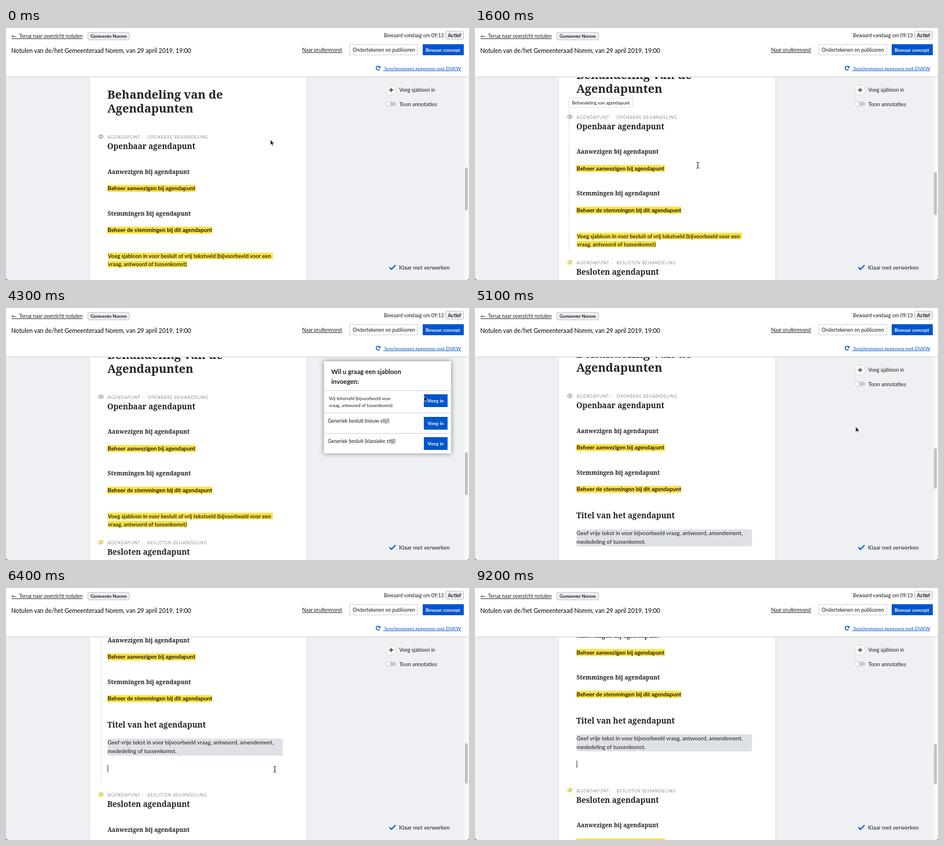
These frames come from a looping animation (800x435 px, 9.3 s). An HTML page:

```html
<!DOCTYPE html>
<html lang="nl">
<head>
<meta charset="utf-8">
<title>Notulen</title>
<style>
html, body { margin: 0; width: 100%; height: 100%; overflow: hidden; background: #333; }
svg { display: block; width: 800px; height: 435px; background: #eff0f3; border-radius: 0 0 4px 4px; }
text { font: 8.6px Lato, sans-serif; fill: #1c1c1c; }
text.b { font-weight: 700; }
text.w { font-size: 8.4px; font-weight: 700; fill: #fff; }
text.u { font-size: 8.8px; text-decoration: underline; }
text.h1, text.h2, text.h3 { font-family: "Noto Serif", serif; font-weight: 700; fill: #222; }
text.h1 { font-size: 20.1px; }
text.h2 { font-size: 13.45px; }
text.h3 { font-size: 10.1px; }
text.cap { font-size: 7.2px; letter-spacing: .75px; fill: #909090; }
text.task { font-size: 9.8px; font-weight: 700; }
text.hint { font-size: 9.4px; font-weight: 700; fill: #38350f; }
text.body { font-size: 9.76px; }
.mark { fill: #fde13f; }
.blue { fill: #05c; }
.line { fill: none; stroke: #cbd2dc; }
.pill { fill: #eeeff1; stroke: #c0c4ca; }
</style>
</head>
<body>
<svg viewBox="0 0 800 435">
  <defs>
    <g id="roll">
      <text class="h3" x="175.5" y="251.5">Aanwezigen bij agendapunt</text>
      <rect class="mark" x="175" y="271" width="153" height="12"/>
      <text class="task" x="175.5" y="280">Beheer aanwezigen bij agendapunt</text>
      <text class="h3" x="175.5" y="323.5">Stemmingen bij agendapunt</text>
      <rect class="mark" x="175" y="343" width="181" height="12"/>
      <text class="task" x="175.5" y="352">Beheer de stemmingen bij dit agendapunt</text>
    </g>
    <g id="eye" fill="none">
      <path d="M-5 0Q0-6.4 5 0Q0 6.4-5 0Z"/>
      <circle r="1.7"/>
    </g>
    <g id="insert">
      <rect class="blue" width="41" height="22"/>
      <text class="w" x="6.5" y="14">Voeg in</text>
    </g>
    <filter id="soft"><feGaussianBlur stdDeviation=".5"/></filter>
  </defs>

  <path d="M144.5 84V436H519.5V84" fill="#fff" stroke="#dfe1e4"/>

  <g id="doc">
    <text class="h1" x="175" y="122">Behandeling van de</text>
    <text class="h1" x="175" y="146">Agendapunten</text>
    <g id="hover">
      <path d="M163 155V171" stroke="#ddd"/>
      <path id="guide" stroke="#c9c9c9" stroke-dasharray="1 1"/>
      <rect x="162.5" y="155.5" width="110" height="16" fill="#fff" stroke="#ddd"/>
      <text x="167.5" y="166.5" style="font-size:7.9px">Behandeling van agendapunt</text>
    </g>
    <use href="#eye" x="164" y="187.5" stroke="#8a8a8a"/>
    <text class="cap" x="175.5" y="191">AGENDAPUNT -</text>
    <text class="cap" x="244.5" y="191">OPENBARE BEHANDELING</text>
    <text class="h2" x="175" y="209">Openbaar agendapunt</text>
    <use href="#roll"/>

    <g id="before" filter="url(#soft)">
      <path class="mark" d="M176 388H461V399H176ZM176 402H313V413H176Z"/>
      <text class="hint" x="176" y="397">Voeg sjabloon in voor besluit of vrij tekstveld (bijvoorbeeld voor een</text>
      <text class="hint" x="176" y="411">vraag, antwoord of tussenkomst)</text>
    </g>
    <g id="after">
      <text class="h2" x="175" y="399">Titel van het agendapunt</text>
      <rect x="175.5" y="418" width="303" height="29.5" fill="#dee1e6"/>
      <text class="body" x="175.5" y="428">Geef vrije tekst in voor bijvoorbeeld vraag, antwoord, amendement,</text>
      <text class="body" x="175.5" y="443">mededeling of tussenkomst.</text>
      <path id="caret" d="M176 463.5V476" stroke="#222"/>
    </g>

    <g id="closed">
      <use href="#eye" x="164" y="514.5" stroke="#d9bb10"/>
      <path d="M160.5 518L167.5 511" stroke="#d9bb10"/>
      <text class="cap" x="175.5" y="518">AGENDAPUNT -</text>
      <text class="cap" x="244.5" y="518">BESLOTEN BEHANDELING</text>
      <text class="h2" x="175" y="536">Besloten agendapunt</text>
      <use href="#roll" y="327"/>
    </g>
  </g>

  <g id="side">
    <circle cx="665.5" cy="107" r="9" fill="#fff" stroke="#cbd0d8"/>
    <path d="M661.5 107H669.5M665.5 103V111" stroke="#333" stroke-width="1.5"/>
    <text x="679.5" y="110">Voeg sjabloon in</text>
    <rect x="657" y="127.5" width="17" height="7" rx="3.5" fill="#c3cad6"/>
    <circle cx="660.5" cy="131" r="4" fill="#fff" stroke="#c3cad6"/>
    <text x="679.5" y="134.5" style="font-size:9.3px">Toon annotaties</text>
  </g>

  <g id="popup">
    <rect x="549.5" y="92" width="219.5" height="159" fill="#fff" style="filter:drop-shadow(0 0 4px #0007)"/>
    <path class="line" d="M549.5 142.5H769M549.5 181.5H769M549.5 216.5H769"/>
    <text class="b" x="562" y="114" style="font-size:11.1px">Wil u graag een sjabloon</text>
    <text class="b" x="562" y="130.5" style="font-size:11.1px">invoegen:</text>
    <text x="558" y="159" style="font-size:7.65px">Vrij tekstveld (bijvoorbeeld voor</text>
    <text x="558" y="171" style="font-size:7.7px">vraag, antwoord of tussenkomst)</text>
    <text x="556" y="197.5">Generiek besluit (nieuw stijl)</text>
    <text x="556" y="232.5">Generiek besluit (klassieke stijl)</text>
    <use href="#insert" x="722" y="149"/>
    <use href="#insert" x="722" y="188"/>
    <use href="#insert" x="722" y="223"/>
  </g>

  <path d="M662.5 413L666 416.5L673 409.5" fill="none" stroke="#05c" stroke-width="2"/>
  <text x="679" y="416.5" style="font-size:9.7px">Klaar met verwerken</text>

  <rect x="791" y="85" width="9" height="350" fill="#f8f8f9"/>
  <path d="M791.5 85V435" stroke="#e9eaec"/>
  <rect id="thumb" x="793" width="5" rx="2.5" fill="#c1c1c3"/>

  <rect width="800" height="84" fill="#fff"/>
  <path d="M0 84.5H800" stroke="#cdcfd3"/>
  <text class="u" x="9.5" y="17">←&#160;&#160;Terug naar overzicht notulen</text>
  <rect class="pill" x="141.5" y="7.5" width="72" height="13" rx="2.5"/>
  <text class="b" x="146" y="17" style="font-size:7.9px">Gemeente Norem</text>
  <text x="9" y="43" style="font-size:10.45px;fill:#000">Notulen van de/het Gemeenteraad Norem, van 29 april 2019, 19:00</text>
  <text x="653" y="16" style="font-size:8.5px">Bewaard vandaag om 09:13</text>
  <rect class="pill" x="759.5" y="5.5" width="31" height="14" rx="2.5"/>
  <text class="b" x="763.5" y="15.5" style="font-size:8.5px">Actief</text>
  <text class="u" x="511.5" y="41">Naar prullenmand</text>
  <rect class="line" x="593.5" y="28.5" width="118" height="18"/>
  <text x="599" y="41">Ondertekenen en publiceren</text>
  <rect class="blue" x="720" y="28" width="71" height="19"/>
  <text class="w" x="725" y="41">Bewaar concept</text>
  <path d="M645.5 71A3.2 3.2 0 1 1 645 67" fill="none" stroke="#05c" stroke-width="1.5"/>
  <path d="M647 65V69H643Z" fill="#05c"/>
  <text class="u" x="651.5" y="72.5" style="font-size:8.4px;fill:#05c">&#160;Synchroniseer gegevens met DVKW</text>

  <g id="mouse">
    <path id="arrow" d="M0 0V9L2.1 7.2L3.6 10.4L5 9.7L3.6 6.6H6.3Z" fill="#111" stroke="#fff" stroke-width=".6"/>
    <path id="beam" d="M-2.5-5H-1L0-4L1-5H2.5M-2.5 5H-1L0 4L1 5H2.5M0-4V4M-1 1H1" fill="none" stroke="#222"/>
  </g>
</svg>
<script>
const LOOP = 9300, OPEN = 2300, INSERT = 4700, CARET = 6000, LEAVE = 7000;
const $ = id => document.getElementById(id);
const show = (id, on) => $(id).style.display = on ? "" : "none";
const move = (id, x, y) => $(id).setAttribute("transform", `translate(${x} ${y})`);

// Keys are [time, ...values], eased between neighbours.
function at(keys, t) {
  const next = keys.findIndex(k => k[0] > t);
  if (next < 0) return keys[keys.length - 1].slice(1);
  if (!next) return keys[0].slice(1);
  const a = keys[next - 1], b = keys[next];
  const p = (t - a[0]) / (b[0] - a[0]), e = p * p * (3 - 2 * p);
  return a.slice(1).map((v, i) => v + (b[i + 1] - v) * e);
}

const pointer = [
  [200, 457, 193], [1100, 385, 237], [1650, 385, 237], [2150, 665, 108],
  [2400, 665, 108], [2900, 579.5, 229.5], [3500, 579.5, 229.5], [4250, 722.5, 152.5],
  [4350, 722.5, 152.5], [4550, 738, 160], [4850, 738, 160], [5550, 464.5, 313]
];
const scrolling = [
  [400, 0], [1100, 34.5], [INSERT - 1, 34.5], [INSERT, 36],
  [5920, 36], [6380, 158], [6450, 158], [6900, 165.5]
];

function draw(now) {
  const t = now % LOOP;
  const [x, y] = at(pointer, t), [scroll] = at(scrolling, t);
  const inserted = t >= INSERT, popup = t >= OPEN && !inserted;
  const hover = t > 600 && t < LEAVE && x < 520;

  move("doc", 0, -scroll);
  move("closed", 0, inserted ? 0 : -75.5);
  show("before", !inserted);
  show("after", inserted);
  show("caret", t >= CARET && t % 1000 < 500);
  show("hover", hover);
  move("hover", inserted ? 1.5 : 0, 0);
  $("guide").setAttribute("d", `M162.5 171V${inserted ? 494 : 418}`);

  show("popup", popup);
  show("side", !popup);

  $("thumb").setAttribute("y", inserted ? 242 + (scroll - 36) * .208 : 241 + scroll * .23);
  $("thumb").setAttribute("height", inserted ? 70 : 74);

  move("mouse", x, y);
  show("mouse", t < LEAVE);
  show("arrow", !hover);
  show("beam", hover);
}

const start = performance.now();
(function tick() {
  draw(performance.now() - start);
  requestAnimationFrame(tick);
})();
</script>
</body>
</html>
```
